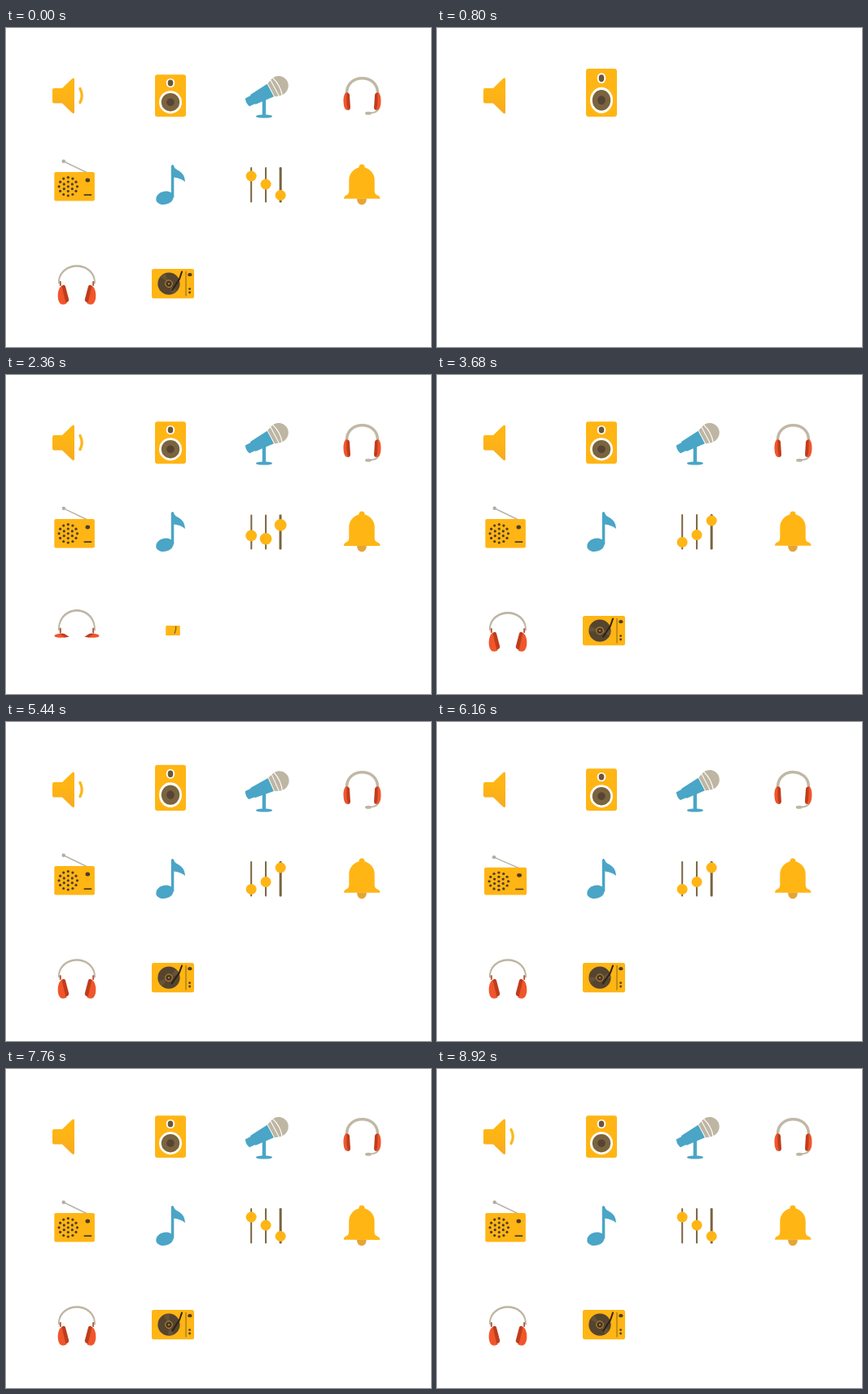
An HTML page that plays this animation: 522x392 px, repeating every 8.96 s.

```html
<!DOCTYPE html>
<html lang="en">
<head>
<meta charset="utf-8">
<title>Audio icons</title>
<style>
html, body { margin: 0; width: 100%; height: 100%; overflow: hidden; background: #fff; }
svg { display: block; width: 100vw; height: 100vh; }
.y { fill: #ffb514; }
.b { fill: #4aa5c6; }
.g { fill: #beb6a3; }
.d { fill: #4e3c2a; }
.m { fill: #79643f; }
.o { fill: #f0562b; }
.r { fill: #bf3d1c; }
.w { fill: #fff; }
.line { fill: none; stroke-linecap: round; stroke-linejoin: round; }
</style>
</head>
<body>
<svg viewBox="0 0 522 392">
  <defs>
    <linearGradient id="cone" x2="0" y2="1">
      <stop offset=".4" stop-color="#ffb514"/>
      <stop offset="1" stop-color="#f6ab20"/>
    </linearGradient>
    <g id="cup">
      <path class="o" d="M419 79C415.500 79 414.300 85 414.500 90.500C414.700 97 416.500 101 419.500 101Z"/>
      <path class="r" d="M418.500 79.500Q421.500 79 422 82L423 97.500Q423 101 419.500 101Q418 92 418.500 79.500Z"/>
    </g>
    <g id="ear">
      <path class="o" d="M69.500 316.500C63.500 317.500 61.500 333 66.500 338.500Q69.500 341 74.500 338.500Z"/>
      <path class="r" d="M68.500 317Q72 314.500 73 317.500L77.200 333.500Q77.500 336.500 73.300 337.500Z"/>
    </g>
  </defs>

  <g id="speaker">
    <path fill="url(#cone)" d="M59 74H69L81 62.500Q84 60 84 63.500V103Q84 106.500 81 104L69 92.500H59Q57 92.500 57 90.500V76Q57 74 59 74Z"/>
  </g>
  <g id="wave"><path class="line" d="M91 74.500Q95.500 83 91 91.500" stroke="#fdb61c" stroke-width="3.300"/></g>

  <g id="cabinet">
    <rect class="y" x="183" y="57.300" width="38" height="51.700" rx="3"/>
    <ellipse class="w" cx="202" cy="67.500" rx="5.300" ry="5.600"/>
    <ellipse cx="202" cy="67.500" rx="3.300" ry="3.900" fill="#6a563c"/>
    <circle class="w" cx="202" cy="91.200" r="14"/>
    <circle class="m" cx="202" cy="91.200" r="11.200"/>
    <circle cx="202" cy="91.200" r="4.800" fill="#574435"/>
  </g>

  <g id="mic">
    <path class="b" d="M314.800 84H319.200V106.500Q327 106.800 327 108.600Q327 110.600 317 110.600Q307 110.600 307 108.600Q307 106.800 314.800 106.500Z"/>
    <g id="micHead"><g transform="translate(317 81) rotate(-28)">
      <path class="b" d="M-23 -6L-16 -6L-15 -7L9 -9V8.500L-15 6.500L-16 5.500L-23 5Q-25.500 0 -23 -6Z"/>
      <path class="g" d="M10 -9.500L14.500 -11V10.500L10 9Z"/>
      <path class="g" d="M15.500 -11.500C25 -15 32.500 -8 32.500 -.5C32.500 7 25 14 15.500 11Z"/>
      <path class="line" d="M18.500 -13Q23 0 18.500 13" stroke="#fff" stroke-width="1.200"/>
    </g></g>
  </g>

  <g id="headset">
    <path class="line" d="M418.500 80C418.500 55.500 456.500 55.500 456.500 80" stroke="#c0b8a6" stroke-width="3.500"/>
    <path class="line" d="M457.500 99Q456 104.500 446 104.500" stroke="#c0b8a6" stroke-width="2"/>
    <ellipse class="g" cx="445" cy="104.700" rx="4" ry="2"/>
    <use href="#cup"/>
    <use href="#cup" transform="matrix(-1 0 0 1 875 0)"/>
  </g>

  <g id="radio">
    <g id="antenna">
      <path class="line" d="M99 177.500L71 164" stroke="#bbb4a8" stroke-width="1.500"/>
      <circle cx="70.700" cy="163.800" r="2.200" fill="#b3ada1"/>
    </g>
    <g id="radioBox"><rect class="y" x="59.300" y="177" width="49.600" height="35.500" rx="2"/></g>
    <g id="dots" class="d"></g>
    <g id="dial" class="d">
      <ellipse cx="100.300" cy="187" rx="2.800" ry="2.500"/>
      <rect x="95.500" y="204.300" width="9.800" height="1.600" rx=".7"/>
    </g>
  </g>

  <g id="note" class="b">
    <ellipse cx="195" cy="208.800" rx="11" ry="8" transform="rotate(-14 195 208.800)"/>
    <path d="M202.800 169.500Q204.500 166.500 206.300 169.500C207 176 219.500 174 220 189Q215 184.500 206.300 183.500V208H202.800Z"/>
  </g>

  <g id="sliders">
    <g id="rails" class="m">
      <rect x="300.200" y="171" width="2" height="43.500" rx="1"/>
      <rect x="318.100" y="171" width="2" height="43.500" rx="1"/>
      <rect x="335.700" y="171" width="3" height="43.500" rx="1.200"/>
    </g>
    <g id="knobs" class="y"></g>
  </g>

  <g id="bell">
    <path fill="#e6a436" d="M431 209.500H443Q442.500 217.200 437 217.200Q431.500 217.200 431 209.500Z"/>
    <circle class="y" cx="437" cy="171" r="3.500"/>
    <path class="y" d="M415 209.800Q415 206.500 418.500 205.200Q421.300 204 421.300 200V187A15.700 16 0 0 1 452.700 187V200Q452.700 204 455.500 205.200Q459.500 206.500 459.500 209.800Z"/>
  </g>

  <g id="phones">
    <g id="band">
      <path class="g" d="M64 314C63 283.500 111 283.500 110 314H108.300C108 287 66 287 65.700 314Z"/>
      <path class="line" d="M66.800 312V316M107.200 312V316" stroke="#b4573e" stroke-width="2"/>
    </g>
    <g id="earL"><use href="#ear"/></g>
    <g id="earR"><use href="#ear" transform="matrix(-1 0 0 1 174 0)"/></g>
  </g>

  <g id="table">
    <rect class="y" x="179" y="296" width="52" height="36.200" rx="2.500"/>
    <g id="disc">
      <circle cx="200" cy="314.200" r="13.600" fill="#55442f"/>
      <g id="shine"><path fill="#675238" d="M200 314.200L190 306A13 13 0 0 1 196 301.800ZM200 314.200L210 322.400A13 13 0 0 1 204 326.600Z"/></g>
      <circle cx="200" cy="314.200" r="4.300" fill="#493827" stroke="#c9962f" stroke-width="1"/>
      <circle cx="200" cy="314.200" r="1" fill="#c9962f"/>
    </g>
    <g id="panel" class="d">
      <rect x="220.500" y="299" width="1" height="30.500" fill="#8b681d"/>
      <ellipse cx="225.800" cy="303.200" rx="2.600" ry="2.100"/>
      <circle cx="225.600" cy="320.600" r="1.400"/>
      <circle cx="225.600" cy="325" r="1.400"/>
    </g>
    <g id="arm"><path class="line" d="M216 299.500L213 308.500L204.300 321.800" stroke="#2c221a" stroke-width="2"/></g>
  </g>
</svg>
<script>
const LOOP = 8960, STEP = 40, CLEAR = 320, TAU = 2 * Math.PI;
const $ = id => document.getElementById(id);

function circle(parent, cx, cy, r) {
  const c = document.createElementNS('http://www.w3.org/2000/svg', 'circle');
  c.setAttribute('cx', cx);
  c.setAttribute('cy', cy);
  c.setAttribute('r', r);
  parent.appendChild(c);
  return c;
}

// Grille: a centre hole and two rings
for (const [count, radius] of [[1, 0], [6, 5.8], [12, 11.2]])
  for (let i = 0; i < count; i++) {
    const a = TAU * i / count + Math.PI / 2;
    circle($('dots'), 76.3 + radius * Math.cos(a), 194.8 + radius * Math.sin(a), 1.6);
  }

// Each knob: x, first height, rest height, final height, time it pops in
const knobs = [
  [301.2, 186, 205.5, 182, 2020],
  [319.1, 208, 196.5, 192, 2090],
  [337.2, 192, 179, 205.5, 2160]
].map(([x, ...rest]) => [circle($('knobs'), x, 0, 6.5), ...rest]);

// Scale and turn a part about a point, then shift it
function pose(id, cx, cy, sx, sy = sx, turn = 0, dx = 0, dy = 0) {
  $(id).setAttribute('transform',
    `translate(${cx + dx} ${cy + dy}) rotate(${turn}) scale(${sx} ${sy}) translate(${-cx} ${-cy})`);
}

const clamp = v => Math.max(0, Math.min(1, v));
const smooth = (t, a, b) => { const u = clamp((t - a) / (b - a)); return u * u * (3 - 2 * u); };
const pop = t => t <= 0 ? 0 : 1 - Math.exp(-t / 130) * Math.cos(t / 90);
const bump = (t, start, len) => Math.sin(Math.PI * clamp((t - start) / len));
const swing = (t, start, len) => t <= start ? 0 :
  Math.exp((start - t) / 300) * Math.sin(TAU * (t - start) / len);

function draw(now) {
  // The opening moments still show the finished set
  const t = now < CLEAR ? now + LOOP : now;
  let s;

  s = pop(t - 400);
  pose('speaker', 57, 83, Math.min(1, s), s * (1 + .06 * bump(t, 4800, 280)));
  const phase = t % (LOOP / 11);
  const wave = t < 2120 ? 0 : 1 - smooth(phase, 140, 230) + smooth(phase, 440, 540);
  pose('wave', 86, 83, wave);

  s = pop(t - 580);
  pose('cabinet', 202, 109, Math.min(1, s),
    s * (1 + .155 * bump(t, 5080, 280) + .115 * bump(t, 5360, 280)));

  pose('mic', 317, 109, pop(t - 830));
  pose('micHead', 317, 84, 1, 1, 5 * swing(t, 5365, 360));

  pose('headset', 437.5, 82, pop(t - 1110), undefined, 4 * swing(t, 5650, 360));

  s = pop(t - 1370);
  pose('radioBox', 84, 212.5, Math.min(1, s), s);
  pose('dots', 76.3, 193.5, pop(t - 1590));
  pose('dial', 100, 196, pop(t - 1680));
  pose('antenna', 99, 177.5, pop(t - 1720));
  const squash = bump(t, 5950, 280);
  pose('radio', 84, 212.5, 1 + .07 * squash, 1 - .07 * squash);

  s = pop(t - 1580);
  pose('note', 203, 192, s, s, 24 * (1 - s) + 6 * swing(t, 6240, 360),
    16 * (1 - s), -4 * (1 - s));

  s = pop(t - 1760);
  pose('rails', 319, 214.5, Math.min(1, s), s);
  for (const [el, first, rest, last, start] of knobs) {
    const y = first + (rest - first) * smooth(t, 2160, 2520)
      + (last - rest) * smooth(t, 6480, 6840);
    el.setAttribute('cy', y);
    el.setAttribute('r', 6.5 * pop(t - start));
  }

  pose('bell', 437, 168, pop(t - 1940), undefined, -7.3 * swing(t, 6800, 360));

  s = pop(t - 2130);
  pose('band', 87, 314, Math.min(1, s), s);
  const ear = pop(t - 2333);
  const wide = ear ? 1 + .4 * Math.max(0, 1 - ear) : 0;
  const tall = ear * (1 + .35 * bump(t, 7080, 280));
  const drop = 2 * Math.max(0, 1 - ear);
  pose('earL', 77, 316, wide, tall, 0, 0, drop);
  pose('earR', 97, 316, wide, tall, 0, 0, drop);

  pose('table', 205, 314, pop(t - 2320) * (1 + .03 * bump(t, 7370, 280)));
  pose('disc', 200, 314.2, pop(t - 2400));
  pose('panel', 224, 314, pop(t - 2440));
  pose('shine', 200, 314.2, 1, 1, 360 * 7 * t / LOOP);
  const settle = -18 * (1 - smooth(t, 2360, 2640));
  pose('arm', 216, 299.5, 1, 1, settle + 2 * (1 - Math.cos(TAU * 7 * t / LOOP)));
}

const begin = performance.now();
function tick() {
  const t = (performance.now() - begin) % LOOP;
  draw(Math.floor(t / STEP) * STEP);
  requestAnimationFrame(tick);
}
tick();
</script>
</body>
</html>
```
